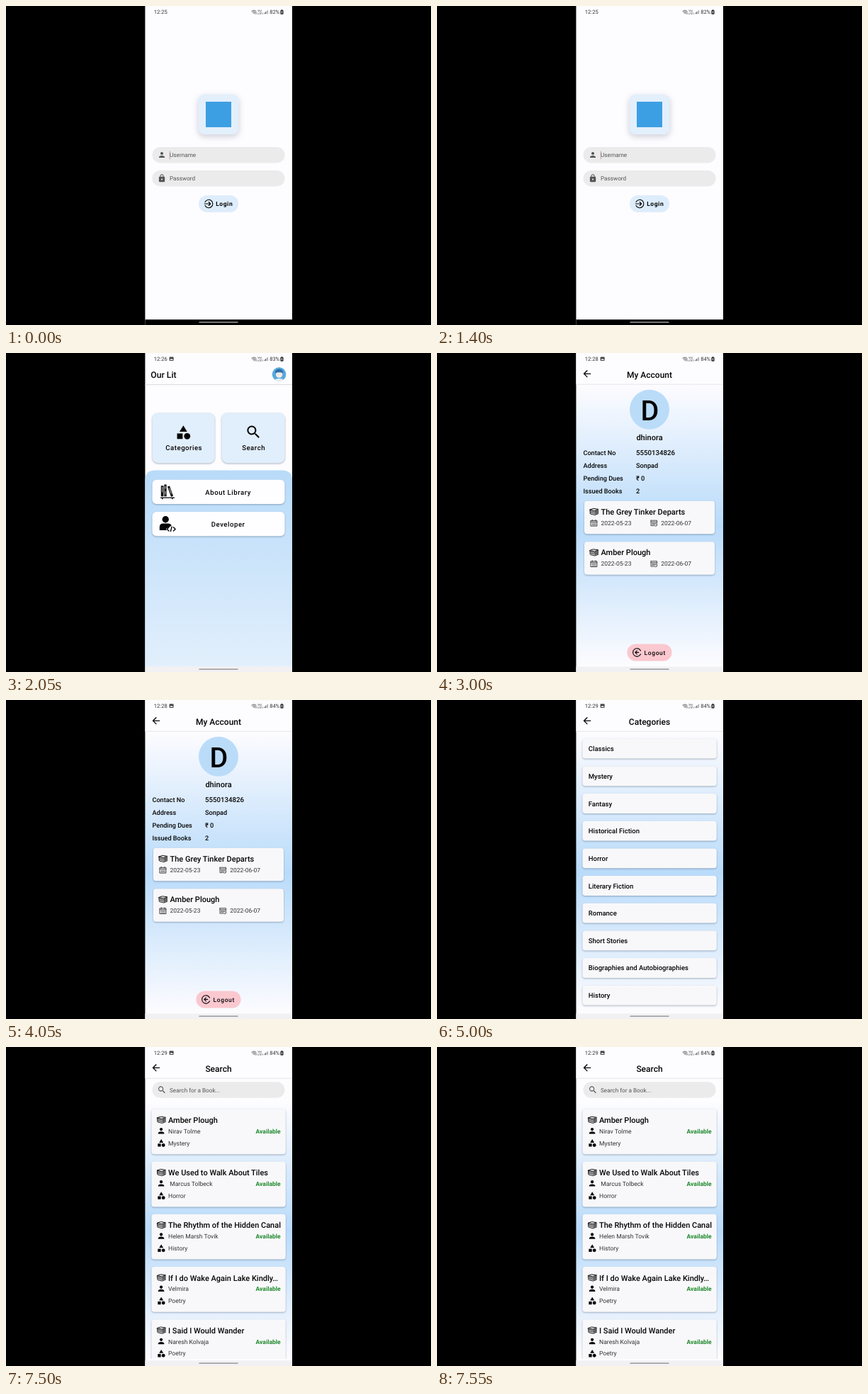
An HTML page that plays this animation: 600 by 450 pixels, repeating every 8000 ms.

```html
<!DOCTYPE html>
<html lang="en">
<head>
<meta charset="utf-8">
<title>Library app</title>
<style>
html, body { margin: 0; width: 100%; height: 100%; overflow: hidden; background: #000; }
svg { display: block; }
#stage { width: 600px; height: 450px; }
text { font-family: Roboto, "Noto Sans", sans-serif; white-space: pre; text-rendering: geometricPrecision; }
.card { filter: drop-shadow(0 1.2px 1.3px rgba(40, 60, 85, .38)); }
.soft { filter: drop-shadow(0 3px 4px rgba(60, 70, 90, .25)); }
.screen { opacity: 0; }
</style>
</head>
<body>
<svg id="stage" viewBox="0 0 600 450" xmlns="http://www.w3.org/2000/svg"></svg>
<script>
const LOOP = 8000;
const PAPER = '#fdfcff';
const INK = '#050505';

// Drawing helpers
const rect = (x, y, w, h, r, fill, more = '') =>
  `<rect x="${x}" y="${y}" width="${w}" height="${h}" rx="${r}" fill="${fill}" ${more}/>`;
const circle = (x, y, r, fill, more = '') =>
  `<circle cx="${x}" cy="${y}" r="${r}" fill="${fill}" ${more}/>`;
const text = (s, x, y, size, o = {}) =>
  `<text x="${x}" y="${y}" font-size="${size}" font-weight="${o.weight || 400}" fill="${o.fill || INK}"` +
  ` text-anchor="${o.anchor || 'start'}" letter-spacing="${o.gap || 0}">${s}</text>`;
const place = (art, x, y, scale = 1, fill = INK) =>
  `<g transform="translate(${x} ${y}) scale(${scale})" fill="${fill}">${art}</g>`;
const line = (d, width, color = INK) =>
  `<path d="${d}" fill="none" stroke="${color}" stroke-width="${width}" stroke-linecap="round" stroke-linejoin="round"/>`;
const card = (x, y, w, h, r = 4, fill = '#f8f8fa') => rect(x, y, w, h, r, fill, 'class="card"');

const icon = {
  person: '<path d="M12 12c2.21 0 4-1.79 4-4s-1.79-4-4-4-4 1.79-4 4 1.79 4 4 4zm0 2c-2.67 0-8 1.34-8 4v2h16v-2c0-2.66-5.33-4-8-4z"/>',
  lock: '<path d="M18 8h-1V6c0-2.76-2.24-5-5-5S7 3.24 7 6v2H6c-1.1 0-2 .9-2 2v10c0 1.1.9 2 2 2h12c1.1 0 2-.9 2-2V10c0-1.1-.9-2-2-2zm-6 9c-1.1 0-2-.9-2-2s.9-2 2-2 2 .9 2 2-.9 2-2 2zm3.1-9H8.9V6c0-1.71 1.39-3.1 3.1-3.1s3.1 1.39 3.1 3.1z"/>',
  search: '<path d="M15.5 14h-.79l-.28-.27A6.5 6.5 0 1 0 13.73 14.43l.27.28v.79l5 4.99L20.49 19zm-6 0a4.5 4.5 0 1 1 0-9 4.5 4.5 0 0 1 0 9z"/>',
  shapes: '<path d="M12 2l-5.5 9h11zM3 13.5h8v8H3z"/><circle cx="17.5" cy="17.5" r="4.5"/>',
  back: '<path d="M20 11H7.83l5.59-5.59L12 4l-8 8 8 8 1.41-1.41L7.83 13H20z"/>',
  stack: line('M.8 2.2L5.6.6l7 1.1-4.8 1.8zM.8 2.2q-1 1 .2 1.9l6.8 1.3 4.8-1.8M1 4.1q-1 1.2 .2 2.1l6.6 1.3 4.8-1.8M1.2 6.2q-1 1.2 .2 2.1l6.4 1.5 4.8-2', .95) +
    line('M8 4.5l4.3-1.6M8 6.6l4.3-1.7M8 8.7l4.3-1.7', .5),
  calendar: line('M.5 1.4h8.6v7.7H.5zM.5 3.3h8.6M2.5.3v1.6M7.1.3v1.6', .9, '#333') +
    line('M2 5h5.6M2 6.4h5.6M2 7.8h5.6', .7, '#555'),
  due: line('M.5 1.2h8.6v3.2M.5 1.2v7.4h4M.5 3.1h8.6M2 5h3M2 6.7h2', .85, '#333') +
    circle(7.2, 7, 2.2, 'none', 'stroke="#333" stroke-width=".8"') + line('M7.2 5.8V7l.8.5', .6, '#333'),
  shelf: '<path d="M.8 2h3.6v15H.8zM5.4.3h3.2V17H5.4zM10 3.4l3-1 5 14.2-3 1z"/><path d="M0 18.2h20v1.4H0zM2 19h1.5v2H2zM16 19h1.5v2H16z"/>' +
    line('M2.6 4v7M7 3v3M7 10v4M12.6 5.5l2.6 7.5', .8, '#fff'),
  developer: '<circle cx="8.4" cy="4.7" r="4.7"/><path d="M0 20v-4.5Q0 10.6 5 10.6h7q4 0 4.8 3.2L9 18l1 2z"/>' +
    line('M13.2 15.8l-2.7 2.6 2.7 2.6M19.6 15.8l2.7 2.6-2.7 2.6M17.3 15.2l-1.7 6.3', 1.4),
};

const arrowRing = (x, y, dir) =>
  `<g transform="translate(${x} ${y}) scale(${dir} 1)">` +
  line('M-5.2-2.4A5.7 5.7 0 1 1-5.2 2.4', 1.1) +
  line(dir > 0 ? 'M-5.8 0H2.4M0-2.5L2.5 0 0 2.5' : 'M-2.4 0H2.4M0-2.5L2.5 0 0 2.5', 1.1) + '</g>';

function statusBar(time, charge, photo) {
  const grey = '#555';
  return text(time, 208.8, 11.2, 7.6, { fill: '#333' }) +
    (photo ? rect(230.6, 5.6, 6, 5.4, .8, '#444') + '<path d="M231.4 10l1.6-2.2 1.1 1.2.8-.8 1.1 1.8z" fill="#fff"/>' : '') +
    line('M346.9 7.2q3.1-2.6 6.2 0M348 8.7q2-1.6 4 0', .9, grey) + circle(350, 10.2, .8, grey) +
    line('M352 9v2.4M353.4 11.2V9', .6, grey) +
    text('Vo)', 355.2, 8.1, 3.9, { fill: grey, weight: 500 }) + text('LTE1', 355, 11.6, 3.7, { fill: grey, weight: 500 }) +
    [0, 1, 2, 3].map(i => rect(364.4 + i * 1.5, 9.6 - i * 1.25, 1, 1.6 + i * 1.25, 0, i < 2 ? grey : '#999')).join('') +
    text(charge + '%', 372.2, 11.2, 7.5, { fill: '#333' }) +
    rect(387.4, 6, 4.2, 5.8, .8, '#333') + rect(388.6, 5.1, 1.8, 1, 0, '#333') +
    '<path d="M389.8 6.8l-1.4 2.3h1l-.4 1.9 1.6-2.5h-1z" fill="#fff"/>';
}

const navBar = dark =>
  rect(196.4, 442.3, 207.6, 7.7, 0, dark ? '#000' : '#f1f0f2') +
  rect(272.3, 445.2, 55.4, 1.9, .95, dark ? '#868686' : '#a6a6a8');

const header = title =>
  rect(196.4, 0, 207.6, 44, 0, PAPER) + rect(196.4, 43.7, 207.6, 1, 0, '#e6e5ea') +
  place(icon.back, 203.9, 21.4, .66) +
  text(title, 300, 35, 12, { weight: 500, anchor: 'middle' });

const paper = fill => rect(196.4, 0, 207.6, 450, 0, fill);

function field(y, art, x, iconY, scale, label) {
  return rect(206.5, y, 187, 22.4, 11.2, '#ebebeb') + place(art, x, iconY, scale, '#555') +
    text(label, 231, y + 14.4, 8.2, { fill: '#555' });
}

function login() {
  return paper(PAPER) + statusBar('12:25', 82) +
    rect(271.5, 124.7, 57, 56.6, 9, '#e3effb', 'class="soft"') +
    rect(282, 135, 36, 36, 0, '#3d9fe3') +
    field(199, icon.person, 214, 204, .5, 'Username') +
    rect(230.8, 204.6, .7, 11.6, 0, '#b57f88') +
    field(232, icon.lock, 213.8, 236.7, .52, 'Password') +
    rect(272, 267, 56.2, 24, 12, '#deedfb') + arrowRing(286.2, 279, 1) +
    text('Login', 296.2, 282.2, 8.5, { weight: 700, gap: .55 }) + navBar(true);
}

function home() {
  const label = (s, x, y) => text(s, x, y, 9.6, { weight: 500, anchor: 'middle', gap: .52 });
  return paper(PAPER) + statusBar('12:26', 83, true) +
    text('Our Lit', 204.3, 35, 12.2, { weight: 500 }) +
    rect(196.4, 44.1, 207.6, 1, 0, '#dedbe2') +
    `<g clip-path="url(#face)">${circle(385.6, 30, 10, '#58a9dc')}` +
    '<path d="M378.5 41q0-5 7.1-5t7.1 5z" fill="#e6eef4"/>' +
    circle(385.6, 30.4, 4.6, '#f1e9e6') + '<path d="M379.8 28.4q0-6 5.8-6t5.8 6q-5.8-2.2-11.6 0z" fill="#2d6fa8"/></g>' +
    card(206.5, 84.6, 88.3, 70.6, 8, '#e1eefb') + card(304.5, 84.6, 89.3, 70.6, 8, '#e1eefb') +
    place(icon.shapes, 238.6, 100.2, .98) + label('Categories', 251.2, 137.4) +
    place(icon.search, 337.4, 99.5) + label('Search', 349.6, 137.4) +
    '<path d="M196.4 442.3V179.5q0-14 14-14h179.6q14 0 14 14v262.8z" fill="url(#panel)"/>' +
    card(206.5, 178.8, 187, 34.2, 6, '#fefdff') + place(icon.shelf, 218, 185.2) + label('About Library', 313.6, 199.6) +
    card(206.5, 224, 187, 34.2, 6, '#fefdff') + place(icon.developer, 216.8, 230) + label('Developer', 313.6, 244.7) +
    navBar();
}

function account() {
  const rows = [['Contact No', '5550134826'], ['Address', 'Sonpad'], ['Pending Dues', '₹ 0'], ['Issued Books', '2']];
  const loan = (title, y) => card(208, y, 184, 46.6) + place(icon.stack, 215.2, y + 10) +
    text(title, 231.5, y + 19.2, 11, { weight: 500 }) +
    place(icon.calendar, 216.8, y + 26.3) + text('2022-05-23', 231.5, y + 34.2, 8.5, { fill: '#333' }) +
    place(icon.due, 301.5, y + 26.3) + text('2022-06-07', 316.2, y + 34.2, 8.5, { fill: '#333' });
  return paper('url(#sky)') + header('My Account') + statusBar('12:28', 84, true) +
    circle(300, 79.8, 28, '#badcf9') + text('D', 300.3, 95, 39.5, { weight: 500, anchor: 'middle' }) +
    text('dhinora', 300, 122.6, 11, { weight: 500, anchor: 'middle' }) +
    rows.map(([k, v], i) => text(k, 206.5, 144.4 + i * 17.95, 9.1, { weight: 500 }) +
      text(v, 281, 144.4 + i * 17.95, i ? 9.2 : 9.7, { weight: 500 })).join('') +
    loan('The Grey Tinker Departs', 208.7) + loan('Amber Plough', 266.2) +
    rect(268.4, 410.4, 63.2, 24.2, 12.1, '#fbc8d0') + arrowRing(282.3, 422.4, -1) +
    text('Logout', 292.6, 425.8, 8.5, { weight: 500, gap: .6 }) + navBar();
}

function categories() {
  const names = ['Classics', 'Mystery', 'Fantasy', 'Historical Fiction', 'Horror', 'Literary Fiction', 'Romance',
    'Short Stories', 'Biographies and Autobiographies', 'History'];
  return paper('url(#sky)') + header('Categories') + statusBar('12:29', 84, true) +
    names.map((s, i) => {
      const y = 54.8 + i * 38.66;
      return card(205.4, y, 189.4, 27.8) + text(s, 213.8, y + 17.4, 9.5, { weight: 500 });
    }).join('') + navBar();
}

function book(y, title, author, genre) {
  const lines = title.split('\n');
  const drop = (lines.length - 1) * 13;
  const a = y + 34.4 + drop;
  return card(205.4, y, 189.4, 63.8 + drop) + place(icon.stack, 212.8, y + 10.2 + drop / 2) +
    lines.map((s, i) => text(s, 229, y + 19.5 + i * 13, 11, { weight: 500 })).join('') +
    place(icon.person, 212.7, a - 10, .53) +
    text(author, 229, a, 8.6, { fill: '#333' }) +
    text('Available', 387.6, a, 8.5, { weight: 700, fill: '#20892f', anchor: 'end' }) +
    place(icon.shapes, 212.7, a + 7.2, .54) + text(genre, 229, a + 16.8, 8.6, { fill: '#333' });
}

function books() {
  return paper('url(#sky)') + header('Books') + statusBar('12:29', 84, true) +
    book(54.5, 'Amber Plough', 'Nirav Tolme', 'Mystery') +
    book(128.7, 'Cold Wicks', 'Mohit Barunla', 'Mystery') +
    book(202.8, 'The Unanswered Calculation Of\nConstable Dorwal', 'Rafeeq Lorn', 'Mystery') +
    book(290.4, 'A Shadow On Corvale Mill', 'Kavita Pellen', 'Mystery') +
    book(364.6, 'A Waning Fig', 'Ravi Bandhorka', 'Mystery') + navBar();
}

function search() {
  const found = [
    ['Amber Plough', 'Nirav Tolme', 'Mystery'],
    ['We Used to Walk About Tiles', ' Marcus Tolbeck', 'Horror'],
    ['The Rhythm of the Hidden Canal', 'Helen Marsh Tovik', 'History'],
    ['If I do Wake Again Lake Kindly…', 'Velmira', 'Poetry'],
    ['I Said I Would Wander', 'Naresh Kolvaja', 'Poetry'],
  ];
  return paper('url(#low)') + header('Search') + statusBar('12:29', 84, true) +
    field(49.3, icon.search, 213.3, 53.7, .56, 'Search for a Book...') +
    `<g clip-path="url(#list)">${found.map((b, i) => book(87.4 + i * 74.2, ...b)).join('')}</g>` + navBar();
}

const gradient = (id, y1, y2, stops) =>
  `<linearGradient id="${id}" gradientUnits="userSpaceOnUse" x1="0" x2="0" y1="${y1}" y2="${y2}">` +
  stops.map((c, i) => `<stop offset="${i / (stops.length - 1)}" stop-color="${c}"/>`).join('') + '</linearGradient>';

const defs = '<defs>' +
  gradient('sky', 45, 442, [PAPER, '#b9dbfa', PAPER]) +
  gradient('low', 78, 440, [PAPER, '#b9dbfa', PAPER]) +
  gradient('panel', 165, 442, ['#b8dbf9', '#e2effc']) +
  '<clipPath id="face"><circle cx="385.6" cy="30" r="10"/></clipPath>' +
  '<clipPath id="list"><path d="M196 78h208v362H196z"/></clipPath></defs>';

// Each screen with the time it appears, in ms
const screens = [[login, 0], [home, 1500], [account, 3000], [categories, 4500], [books, 6000], [search, 7500]];

const stage = document.getElementById('stage');
stage.innerHTML = defs + rect(0, 0, 600, 450, 0, '#000') +
  screens.map(([draw]) => `<g class="screen">${draw()}</g>`).join('');

stage.querySelectorAll('.screen').forEach((el, i) => {
  const start = screens[i][1] / LOOP;
  const end = i + 1 < screens.length ? screens[i + 1][1] / LOOP : 1;
  const steps = [];
  if (start > 0) steps.push([0, 0]);
  steps.push([start, 1], [end, end < 1 ? 0 : 1]);
  if (end < 1) steps.push([1, 0]);
  el.animate(steps.map(([offset, opacity]) => ({ offset, opacity, easing: 'step-end' })),
    { duration: LOOP, iterations: Infinity });
});
</script>
</body>
</html>
```
